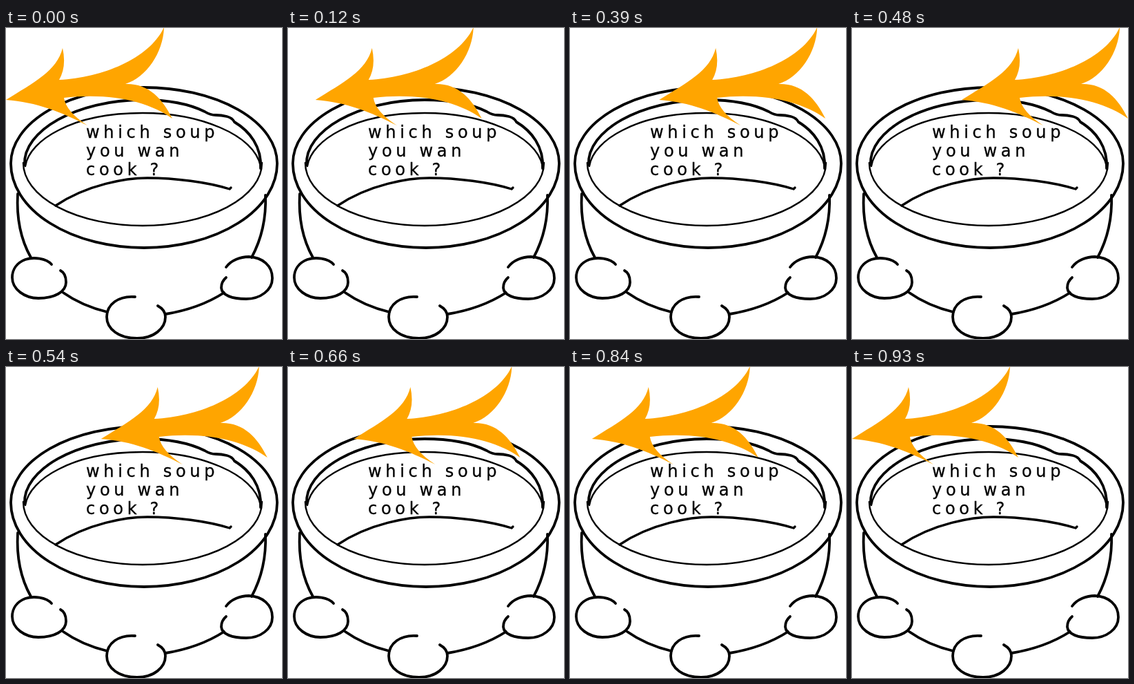
An HTML page that plays this animation: 400 by 450 pixels, repeating every 0.96 s.

```html
<!DOCTYPE html>
<html lang="en">
<head>
<meta charset="utf-8">
<title>Soup pot</title>
<style>
  html, body { margin: 0; width: 100%; height: 100%; overflow: hidden; background: #fff; }
  svg { display: block; width: 400px; height: 450px; }
  .ink { fill: none; stroke: #000; stroke-width: 3.8; stroke-linecap: round; stroke-linejoin: round; }
  .ink .thin { stroke-width: 2.4; }
  text { font: 24px "DejaVu Sans", sans-serif; letter-spacing: 5.7px; stroke: #000; stroke-width: .3; }
</style>
</head>
<body>
<svg viewBox="0 0 400 450">
  <g class="ink">
    <!-- rim -->
    <path d="M7 196A193 110 0 0 1 393 196A193 122 0 0 1 7 196Z"/>
    <path d="M27 198C24 149 102 104 198 104C240 104 268 111 288 121Q296 126 304 126T320 128T331 136C353 149 371 172 369 203"/>
    <path class="thin" d="M25 195A173 91 0 0 0 371 195"/>
    <path class="thin" d="M28 200C31 180 50 161 76 148C110 130 155 123 198 123C280 123 360 154 369 200"/>
    <!-- soup level -->
    <path d="M72 257C118 226 175 217 205 217C245 217 292 223 324 233L326 231" stroke-width="3.4"/>
    <!-- body -->
    <path d="M17 240Q14 293 36 332M376 242Q378 291 356 332M83 383Q110 402 147 411M231 414Q280 406 316 383"/>
    <!-- feet -->
    <path d="M66 342C58 333 40 331 28 335C15 340 9 350 9 361C9 378 27 391 47 391C70 391 87 382 87 368Q87 355 79 351"/>
    <path d="M319 346C326 336 340 331 352 331C372 332 386 344 386 362C386 379 369 392 348 392C328 392 313 387 312 376Q312 367 319 361"/>
    <path d="M187 389C163 387 146 400 146 418C146 436 164 449 190 449C214 449 231 435 231 418Q231 408 220 402"/>
  </g>
  <text><tspan x="116" y="159">which soup</tspan><tspan x="116" y="186">you wan</tspan><tspan x="116" y="213">cook ?</tspan></text>
  <path id="arrow" fill="#ffa500" d="M0 104C40 79 74 62 82 29Q88 56 77 75C140 72 208 44 229 -1C228 35 204 71 173 81C206 80 226 101 241 131C208 107 152 93 84 101Q87 121 118 141C81 122 44 107 0 104Z"/>
</svg>
<script>
  const STEP = 30, STEPS = 32, TURN = 16, REACH = 159;
  const arrow = document.getElementById('arrow');

  // Linear out to the right edge, then linear back.
  function draw() {
    const i = Math.floor(performance.now() / STEP) % STEPS;
    const part = i < TURN ? i / TURN : (STEPS - 1 - i) / (STEPS - 1 - TURN);
    arrow.setAttribute('transform', `translate(${REACH * part} 0)`);
    requestAnimationFrame(draw);
  }
  draw();
</script>
</body>
</html>
```
